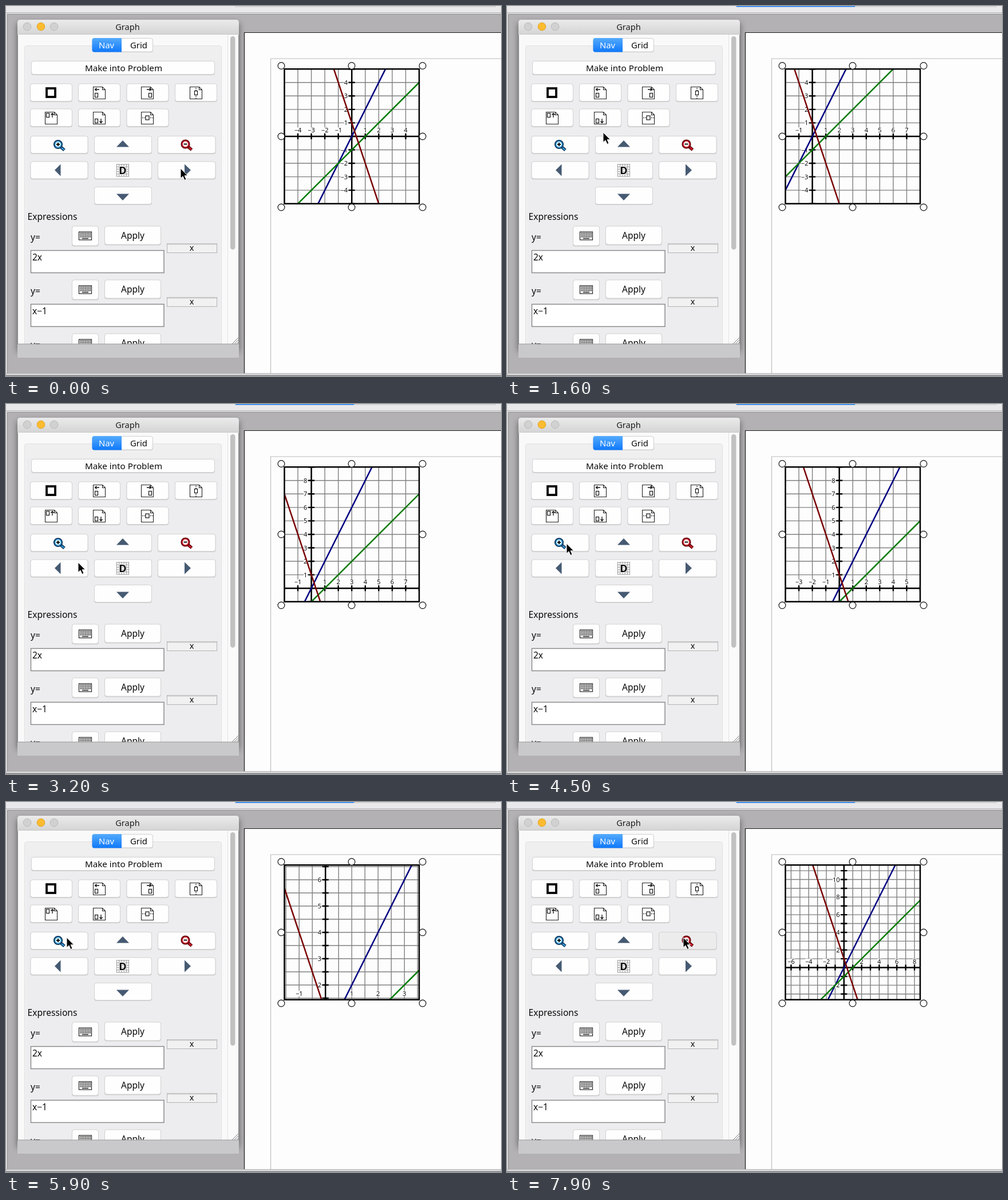
Write an HTML page that moves like this. It is 865x647 px and loops after 8 s.

```html
<!DOCTYPE html>
<html lang="en">
<head>
<meta charset="utf-8">
<title>Graph panel</title>
<style>
  html, body { margin: 0; width: 100%; height: 100%; overflow: hidden; background: #b3b1b4; }
  svg { display: block; font-family: "Noto Sans", "Open Sans", sans-serif; fill: #0a0a0a; }
  #panel text { font-weight: 500; }
</style>
</head>
<body>
<svg id="stage" width="865" height="647" viewBox="0 0 865 647">
  <defs>
    <linearGradient id="titleFill" x2="0" y2="1"><stop stop-color="#ebebeb"/><stop offset="1" stop-color="#d3d3d3"/></linearGradient>
    <linearGradient id="tabFill" x2="0" y2="1"><stop stop-color="#55abfb"/><stop offset="1" stop-color="#0f78fb"/></linearGradient>
    <filter id="shadow" x="-10%" y="-10%" width="120%" height="120%"><feGaussianBlur stdDeviation="6"/></filter>
    <clipPath id="windowClip"><rect x="21" y="50" width="385" height="541"/></clipPath>
    <clipPath id="plotClip"><rect x="486.5" y="110.2" width="235.5" height="235.5"/></clipPath>
  </defs>
  <g id="backdrop"></g>
  <g id="plot"></g>
  <g id="handles"></g>
  <g id="panel"></g>
  <path id="cursor" d="M0 0V17.5L4 13.8 7 20.5 10 19.2 7.1 12.7H12.5Z" fill="#000" stroke="#fff" stroke-width="1" stroke-linejoin="round"/>
</svg>
<script>
const LOOP = 8000, STEP = 100;
const BOX = { x: 486.5, y: 110.2, size: 235.5 };
const byId = id => document.getElementById(id);

const rect = (x, y, w, h, fill, extra = '') =>
  `<rect x="${x}" y="${y}" width="${w}" height="${h}" fill="${fill}" ${extra}/>`;
const line = (x1, y1, x2, y2, stroke, width = 1, extra = '') =>
  `<line x1="${x1}" y1="${y1}" x2="${x2}" y2="${y2}" stroke="${stroke}" stroke-width="${width}" ${extra}/>`;
const path = (d, fill = 'none', stroke = 'none', width = 1) =>
  `<path d="${d}" fill="${fill}" stroke="${stroke}" stroke-width="${width}"/>`;
const circle = (x, y, r, fill, stroke, width = 1) =>
  `<circle cx="${x}" cy="${y}" r="${r}" fill="${fill}" stroke="${stroke}" stroke-width="${width}"/>`;
const text = (x, y, size, str, anchor = 'start', extra = '') =>
  `<text x="${x}" y="${y}" font-size="${size}" text-anchor="${anchor}" ${extra}>${str}</text>`;
const button = (x, y, w, h, id = '') =>
  rect(x, y + 1, w, h, '#cfcfcf', 'rx="4"') +
  rect(x + .5, y + .5, w - 1, h - 1, '#fefefe', `rx="4" stroke="#d2d2d2" ${id && `id="${id}"`}`);

// ---- static scenery ----
function backdrop() {
  return rect(0, 0, 865, 647, '#b3b1b4') + rect(0, 0, 865, 14, '#e9e8ea') +
    rect(401, -4, 454, 5, '#efefef', 'stroke="#bdbdbd"') +
    line(608.5, 0, 608.5, 1, '#bbb') + line(820.5, 0, 820.5, 1, '#bbb') +
    rect(401, 0, 207, 1.5, '#1a80f8', 'id="activeTab"') +
    line(0, 12, 865, 12, '#a3a2a4', 1.2) + line(2, 14.5, 865, 14.5, '#8b8a8c') +
    rect(0, 14, 2, 630, '#dcdbdd') + line(2.5, 14, 2.5, 643, '#8b8a8c') +
    rect(416, 46, 449, 597, '#fefdfe') + path('M416.5 643V46.5H865', 'none', '#1c1c1c', 1.2) +
    path('M462.5 643V92H865', 'none', '#bcbcbc', 1.2) +
    rect(0, 642, 865, 5, '#ebebeb') + line(0, 642.7, 865, 642.7, '#a3a2a4') + line(0, 646, 865, 646, '#77767a', 1.3);
}

const pageIcon = (x, y, inner) =>
  path(`M${x} ${y}h16l5 5v16h-21z M${x + 16} ${y}v5h5`, '#fff', '#222', 1.1) + inner;
const chip = (x, y, w = 5, h = 7) => rect(x, y, w, h, '#fff', 'stroke="#111" stroke-width="1.2"');
const arrow = (x, y, angle) =>
  `<g transform="translate(${x} ${y}) rotate(${angle})">${path('M-4 0H3M0.5 -2.5L3.5 0L0.5 2.5', 'none', '#111', 1.3)}</g>`;

function layoutIcons() {
  return rect(71, 144, 15, 15, '#fff', 'stroke="#000" stroke-width="3.8"') +
    pageIcon(152.5, 141.5, chip(155.5, 152.5) + arrow(159, 146, 180)) +
    pageIcon(236.5, 141.5, chip(249.5, 152.5) + arrow(250, 146, 0)) +
    pageIcon(321.5, 141.5, line(332, 143, 332, 162, '#111', 1.2, 'stroke-dasharray="2 1.5"') + chip(329.5, 148.5)) +
    pageIcon(68.5, 185.5, chip(70.5, 187.5) + arrow(81, 191, -90)) +
    pageIcon(152.5, 185.5, chip(155.5, 197.5) + arrow(166, 201, 90)) +
    pageIcon(236.5, 185.5, line(238, 195.5, 257, 195.5, '#111', 1.2, 'stroke-dasharray="2 1.5"') + chip(244, 192, 6, 7));
}

const lens = (x, y, dark, glass, bright, sign) =>
  line(x + 4, y + 4, x + 11, y + 10, dark, 5.4) + line(x + 6, y + 6, x + 10.5, y + 9.5, bright, 2.2) +
  circle(x, y, 6.8, glass, dark, 2.6) + circle(x, y, 5.4, 'none', bright, 1.4) + path(sign, 'none', '#111', 2);

function navIcons() {
  const slate = '#465a72';
  let mesh = '';
  for (let i = 0; i < 6; i++) {
    const o = i * 4.2;
    mesh += line(193, 277 + o, 215, 277 + o, '#999') + line(193.5 + o, 276, 193.5 + o, 298, '#999');
  }
  return lens(91, 242, '#123b60', '#d8f1ff', '#35a4e8', 'M88 242h6M91 239v6') +
    lens(313.5, 241.5, '#6a0610', '#fff', '#e0202c', 'M310.5 241.5h6') +
    path('M193 246.5L204 235 215 246.5Z M193 328.5H215L204 340Z M95.5 276.5V297.5L85 287Z M312 276.5V297.5L323 287Z', slate) +
    mesh + text(204, 293.5, 18, 'D', 'middle', 'style="font-weight:600" stroke="#fff" stroke-width="2" paint-order="stroke"');
}

function keyboardIcon(x, y) {
  const keys = [3, 6, 9].map(dy =>
    line(x + 2.5, y + dy, x + 21, y + dy, '#222', 1.8, 'stroke-dasharray="1.8 1"')).join('');
  return rect(x + .5, y + .5, 22, 14, '#fff', 'stroke="#222" stroke-width="1.2"') + keys +
    line(x + 6, y + 12, x + 17, y + 12, '#222', 1.5);
}

function expression(y, formula) {
  return text(43, y + 25, 15.5, 'y=') + button(115, y, 47, 35) + keyboardIcon(127, y + 10) +
    button(172, y, 99, 33) + text(221.5, y + 22, 15.5, 'Apply', 'middle') +
    rect(281.5, y + 31, 87, 16, '#f1f1f1', 'stroke="#b4b4b4"') + line(282, y + 32, 368, y + 32, '#cdcdcd', 2) +
    text(324.5, y + 43.5, 14.5, 'x', 'middle') +
    rect(43.5, y + 43, 232.5, 39, '#fff', 'stroke="#858585" stroke-width="1.4"') +
    text(46, y + 60, 15.5, formula);
}

function panel() {
  const columns = [42, 126, 210.5, 295];
  const lights = [[37, '#d2d1d2', '#b9b9b9'], [61, '#fdbc30', '#dfa023'], [84, '#d2d1d2', '#b9b9b9']];
  const body =
    rect(20, 50, 387, 541, '#f9f9f9') +
    rect(32.5, 69.5, 344, 540, '#efeff0', 'rx="4" stroke="#e0e0e0"') +
    rect(36, 94, 338, 510, '#edecee') +
    rect(387, 50, 20, 541, '#fafafa') + line(387.5, 50, 387.5, 591, '#e4e4e4') +
    rect(392, 53, 8.5, 373, '#c1c1c1', 'rx="4.2"') +
    rect(150.5, 57, 106.5, 24, '#cfcfcf', 'rx="4"') + rect(151, 56.5, 105.5, 23.5, '#fff', 'rx="4" stroke="#cfcfcf"') +
    path('M202 56V80.5H154.5Q150.5 80.5 150.5 76.5V60Q150.5 56 154.5 56Z', 'url(#tabFill)') +
    text(175.5, 73.5, 14.9, 'Nav', 'middle', 'fill="#fff"') + text(232, 73.5, 14.9, 'Grid', 'middle') +
    button(44, 96, 321, 24) + text(205.5, 113.5, 15.2, 'Make into Problem', 'middle') +
    columns.map(x => button(x, 135.5, 74, 31.5)).join('') +
    columns.slice(0, 3).map(x => button(x, 179.5, 74, 31.5)).join('') + layoutIcons() +
    button(42.5, 227, 101, 31, 'zoomIn') + button(154, 227, 101, 31, 'up') + button(265, 227, 101.5, 31, 'zoomOut') +
    button(42.5, 271.5, 101, 31, 'left') + button(154, 271.5, 101, 31) + button(265, 271.5, 101.5, 31, 'right') +
    button(154, 316, 101, 31) + navIcons() +
    text(37.5, 374, 15.6, 'Expressions') +
    ['2x', 'x−1', ''].map((f, i) => expression(384.5 + i * 94, f)).join('') +
    path('M395 591L407 579M399 591L407 583M403 591L407 587', 'none', '#777');
  return rect(20, 30, 387, 574, '#000', 'filter="url(#shadow)" opacity=".5"') +
    rect(20, 591, 387, 24, '#c9c8ca') +
    rect(20, 50, 387, 541, '#8f8e90') +
    path('M20 51V29Q20 24 25 24H402Q407 24 407 29V51Z', 'url(#titleFill)') +
    line(20, 50, 407, 50, '#b9b9b9') +
    lights.map(([x, fill, stroke]) => circle(x, 36, 6.8, fill, stroke)).join('') +
    text(212.5, 42, 14.6, 'Graph', 'middle', 'fill="#1c1c1c"') +
    `<g clip-path="url(#windowClip)">${body}</g>` + line(20, 591, 407, 591, '#999');
}

function handles() {
  let out = '';
  for (const x of [481, 604, 728]) for (const y of [104.5, 228, 352])
    if (x !== 604 || y !== 228) out += circle(x, y, 5.9, '#fff', '#111', 1.2);
  return out;
}

// ---- plot ----
const LINES = [[2, 0, '#000080'], [1, -1, '#007a00'], [-3, 1, '#780000']];

function plot({ cx, cy, range }) {
  const { x: left, y: top, size } = BOX, right = left + size, bottom = top + size;
  const unit = size / range, x0 = cx - range / 2, y0 = cy - range / 2;
  const px = x => left + (x - x0) * unit, py = y => bottom - (y - y0) * unit;
  const grid = range < 9.9 ? .5 : 1;
  const minGap = grid < 1 ? 36 : 20;
  const every = Math.ceil(minGap / (grid * unit));
  const axisX = px(0), axisY = py(0);
  let mesh = '', ticks = '', labels = '';

  const label = (x, y, value, anchor) => {
    const str = String(value).replace('-', '−');
    const w = str.length * 6.3 - (str.includes('.') ? 3.3 : 0);
    labels += rect(anchor === 'end' ? x - w : x - w / 2, y - 8.5, w, 9.5, '#fff') + text(x, y, 11, str, anchor);
  };
  const eachStep = (from, visit) => {
    for (let i = Math.ceil(from / grid - 1e-6); i * grid <= from + range + 1e-6; i++)
      visit(i * grid, i !== 0 && i % every === 0);
  };

  eachStep(x0, (v, labelled) => {
    const x = px(v);
    mesh += line(x, top, x, bottom, '#808080', 1.4);
    ticks += line(x, axisY - 5, x, axisY + 5, '#000', 2.4);
    const margin = grid < 1 && v % 1 ? 10 : 7;
    if (labelled && x - left > margin && right - x > margin) label(x, Math.min(axisY, bottom) - 7, v, 'middle');
  });
  eachStep(y0, (v, labelled) => {
    const y = py(v);
    mesh += line(left, y, right, y, '#808080', 1.4);
    ticks += line(axisX - 5.5, y, axisX + 5.5, y, '#000', 2.4);
    if (labelled && y - top > 5 && bottom - y > 5) label(axisX - 7.2, y + 4, v, 'end');
  });

  const axes = line(left, axisY, right, axisY, '#000', 2.5) + line(axisX, top, axisX, bottom, '#000', 2.5);
  const x1 = x0 + range;
  const curves = LINES.map(([m, b, color]) =>
    line(px(x0), py(m * x0 + b), px(x1), py(m * x1 + b), color, 2.5)).join('');
  return `<g clip-path="url(#plotClip)">${mesh}${labels}${axes}${ticks}${curves}</g>` +
    rect(left, top, size, size, 'none', 'stroke="#000" stroke-width="2.5"');
}

// ---- timeline ----
const ACTIONS = {
  right: { at: [300, 700, 1100], apply: v => { v.cx++; } },
  up: { at: [2100, 2300, 2600, 2800], apply: v => { v.cy++; } },
  left: { at: [3500, 3800], apply: v => { v.cx--; } },
  zoomIn: { at: [4700, 5100, 5500], apply: v => { v.range *= .8; } },
  zoomOut: { at: [6700, 7000, 7300, 7500, 7700, 7900], apply: v => { v.range *= 1.2; } }
};
const TRAIL = [
  [0, 305, 284], [1200, 305, 284], [1600, 168, 221], [1900, 200, 238], [2900, 200, 238],
  [3200, 126, 277], [3400, 96, 286], [3900, 96, 286], [4400, 104, 244], [5400, 104, 244],
  [5800, 106, 237], [6000, 106, 237], [6500, 308, 237], [LOOP, 308, 237]
];

function cursorAt(t) {
  const i = TRAIL.findIndex(([end]) => end > t);
  const [ta, xa, ya] = TRAIL[i - 1], [tb, xb, yb] = TRAIL[i];
  const k = (t - ta) / (tb - ta), e = k * k * (3 - 2 * k);
  return [xa + (xb - xa) * e, ya + (yb - ya) * e];
}

let lastView = '';
function render(t) {
  const view = { cx: 0, cy: 0, range: 10 };
  for (const [id, { at, apply }] of Object.entries(ACTIONS)) {
    at.filter(when => when <= t).forEach(() => apply(view));
    const pressed = at.some(when => t >= when && t < when + STEP);
    byId(id).setAttribute('fill', pressed ? '#ececec' : '#fefefe');
  }
  const key = JSON.stringify(view);
  if (key !== lastView) {
    byId('plot').innerHTML = plot(view);
    lastView = key;
  }
  byId('activeTab').setAttribute('opacity', t < STEP ? 0 : 1);
  byId('cursor').setAttribute('transform', `translate(${cursorAt(t)})`);
}

byId('backdrop').innerHTML = backdrop();
byId('handles').innerHTML = handles();
byId('panel').innerHTML = panel();

const start = performance.now();
function tick() {
  const t = (performance.now() - start) % LOOP;
  render(Math.floor(t / STEP) * STEP);
  requestAnimationFrame(tick);
}
tick();
</script>
</body>
</html>
```
